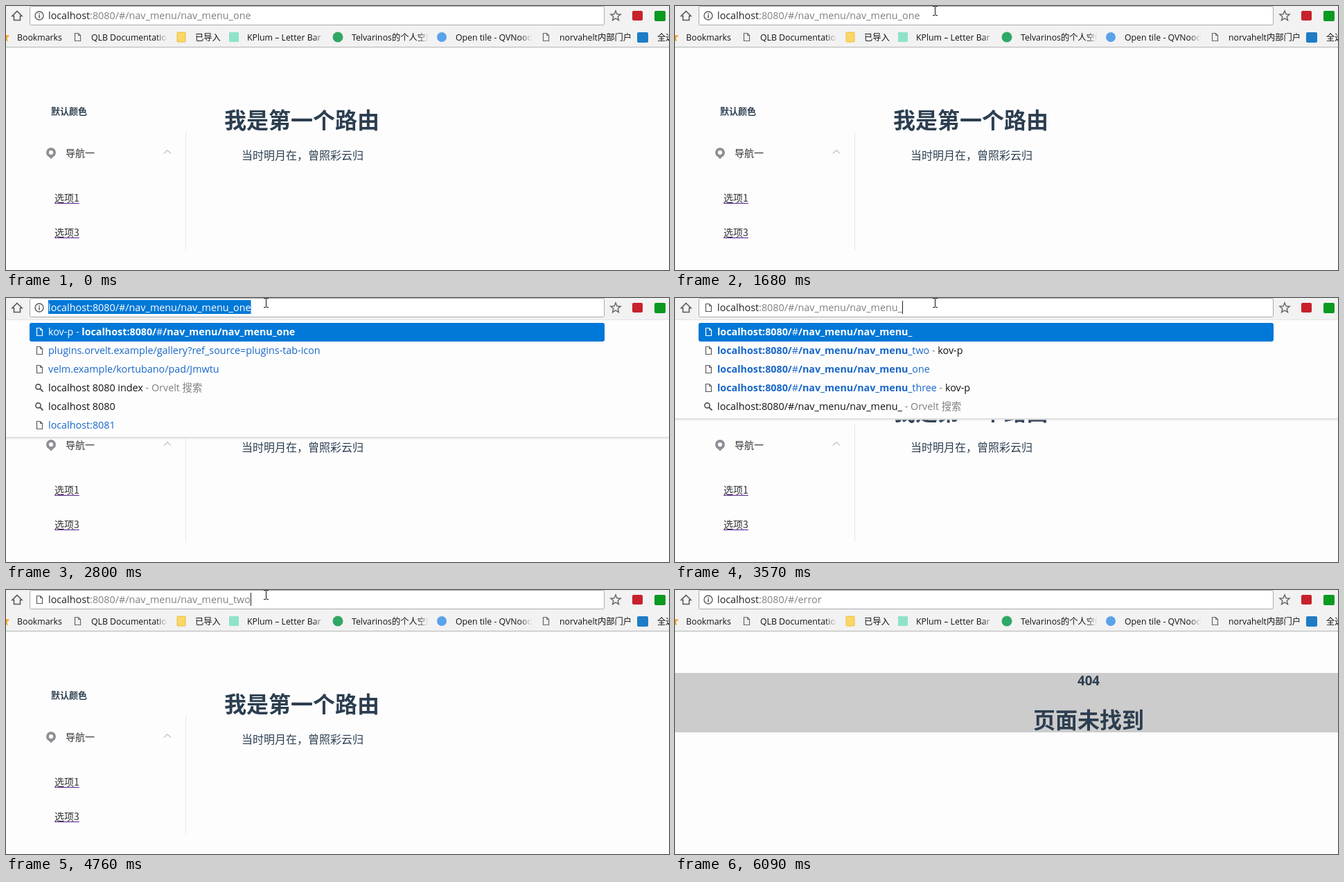
Write an HTML page with a canvas that moves like this. It is 957x382 px and loops after 6.72 s.

```html
<!DOCTYPE html>
<html lang="zh-CN">
<head>
<meta charset="utf-8">
<title>Route demo</title>
<style>
html, body { margin: 0; width: 100%; height: 100%; overflow: hidden; background: #fdfdfd; }
canvas { display: block; }
</style>
</head>
<body>
<canvas id="stage" width="957" height="382"></canvas>
<script>
const c = document.getElementById('stage').getContext('2d');
const LOOP = 6720, STEP = 70;
const UI = '"Open Sans", "Noto Sans CJK SC", "Noto Sans CJK", sans-serif';
const CJK = '"Noto Sans CJK SC", "Noto Sans CJK", sans-serif';
const BLUE = '#0078d7', LINK = '#1967c9', GREY = '#808080', INK = '#2c3e50';
const URL_FONT = `14.35px ${UI}`, URL_BOLD = `bold 14.3px ${UI}`;
const BASE = 'localhost:8080/#/nav_menu/nav_menu_';

function rect(x, y, w, h, color) {
  c.fillStyle = color;
  c.fillRect(x, y, w, h);
}

function rounded(x, y, w, h, r, fill, stroke) {
  c.beginPath();
  c.roundRect(x, y, w, h, r);
  if (fill) { c.fillStyle = fill; c.fill(); }
  if (stroke) { c.strokeStyle = stroke; c.lineWidth = 1; c.stroke(); }
}

function disc(x, y, r, color) {
  c.beginPath();
  c.arc(x, y, r, 0, 7);
  c.fillStyle = color;
  c.fill();
}

function poly(points, color, width, close, fill) {
  c.beginPath();
  points.forEach(([x, y]) => c.lineTo(x, y));
  if (close) c.closePath();
  if (fill) { c.fillStyle = fill; c.fill(); }
  if (width) { c.strokeStyle = color; c.lineWidth = width; c.stroke(); }
}

// Draws text and returns the x where it ends.
function text(str, x, y, font, color, align = 'left') {
  c.font = font;
  c.fillStyle = color;
  c.textAlign = align;
  c.fillText(str, x, y);
  return x + c.measureText(str).width;
}

function widthOf(str) {
  c.font = URL_FONT;
  return c.measureText(str).width;
}

function docIcon(x, y, color) {
  const l = x - 3.5, r = x + 4.5, t = y - 5.5, b = y + 5.5;
  poly([[l, t], [x + 1.5, t], [r, t + 3], [r, b], [l, b]], color, 1.2, true);
  poly([[x + 1.5, t], [x + 1.5, t + 3], [r, t + 3]], color, 1);
}

function searchIcon(x, y) {
  c.beginPath();
  c.arc(x - 1.5, y - 1.5, 3.6, 0, 7);
  c.strokeStyle = '#5a5a5a';
  c.lineWidth = 1.7;
  c.stroke();
  poly([[x + 1.2, y + 1.2], [x + 5.5, y + 5.5]], '#5a5a5a', 2);
}

function infoIcon(x, y) {
  c.beginPath();
  c.arc(x, y, 6, 0, 7);
  c.strokeStyle = '#5a5a5a';
  c.lineWidth = 1.4;
  c.stroke();
  rect(x - 0.8, y - 1, 1.6, 4.5, '#5a5a5a');
  rect(x - 0.8, y - 3.4, 1.6, 1.6, '#5a5a5a');
}

function star(x, y, r, color, fill) {
  const pts = Array.from({ length: 10 }, (_, i) => {
    const a = -Math.PI / 2 + i * Math.PI / 5, d = i % 2 ? r * 0.45 : r;
    return [x + d * Math.cos(a), y + d * Math.sin(a)];
  });
  poly(pts, color, 1.5, true, fill);
}

function addressBar({ url, selectFrom, caret, icon }) {
  rect(0, 0, 957, 60, '#f2f2f2');
  poly([[16, 7.5], [23, 14.5], [20.5, 14.5], [20.5, 20.5], [11.5, 20.5], [11.5, 14.5], [9, 14.5]], '#5a5a5a', 1.6, true);
  rounded(34.5, 0.5, 829, 27, 2, '#fff', '#a9a9a9');
  if (icon === 'doc') docIcon(48, 14, '#5a5a5a');
  else infoIcon(48, 14);

  const mid = text('localhost', 61, 19, URL_FONT, '#222');
  const end = text(url.slice(9), mid, 19, URL_FONT, GREY);
  if (selectFrom !== undefined) {
    const x = 61 + widthOf(url.slice(0, selectFrom));
    rect(x, 3, end - x, 20, BLUE);
    text(url.slice(selectFrom), x, 19, URL_FONT, '#fff');
  }
  if (caret) rect(Math.round(end), 4, 1, 19, '#222');

  star(880, 14.5, 7.5, '#6a6a6a');
  rounded(904, 7, 15, 14, 2, '#c8202c');
  rounded(936, 7, 16, 15, 2, '#0a9a20');
}

function bookmark(str, x, end) {
  let color = '#111';
  if (end) {
    color = c.createLinearGradient(end - 16, 0, end, 0);
    color.addColorStop(0, '#111');
    color.addColorStop(1, 'rgba(17,17,17,0)');
  }
  c.save();
  c.beginPath();
  c.rect(x, 34, (end || 957) - x, 24);
  c.clip();
  text(str, x, 50, `12.3px ${UI}`, color);
  c.restore();
}

function bookmarks() {
  star(-2, 45, 6, '#f5a623', '#f5a623');
  bookmark('Bookmarks', 16);
  docIcon(103, 45, '#666');
  bookmark('QLB Documentation', 123, 233);
  rounded(247, 38, 12, 14, 1, '#fbd866', '#e8bd45');
  bookmark('已导入', 273);
  rect(322, 38, 14, 14, '#8fe3cb');
  bookmark('KPlum – Letter Bar', 348, 460);
  disc(479, 45, 7.5, '#2fa866');
  bookmark('Telvarinos的个人空间', 499, 610);
  disc(629, 45, 7, '#5aa2ea');
  bookmark('Open tile - QVNoodl', 649, 759);
  docIcon(779, 45, '#666');
  bookmark('norvahelt内部门户', 799);
  rounded(911, 38, 16, 15, 2, '#1f7cc4');
  bookmark('全选', 940);
  rect(0, 59, 957, 1, '#b4b4b4');
}

function menuPage() {
  text('默认颜色', 65, 157, `bold 13px ${CJK}`, INK);
  disc(65, 212, 7, '#8d9095');
  poly([[58.8, 215], [65, 221.5], [71.2, 215]], '', 0, true, '#8d9095');
  disc(65, 212, 3.1, '#fdfdfd');
  text('导航一', 86, 218, `14px ${CJK}`, '#303133');
  poly([[228, 213.5], [233, 208.5], [238, 213.5]], '#909399', 1);
  rect(259, 183, 1, 170, '#e6e6e6');
  [['选项1', 283], ['选项3', 333]].forEach(([label, y]) => {
    const end = text(label, 70, y, `14px ${CJK}`, '#303133');
    rect(70, y + 2, end - 70, 1, '#551a8b');
  });
  text('我是第一个路由', 315, 176.5, `bold 32px ${CJK}`, INK);
  text('当时明月在，曾照彩云归', 340, 222, `16px ${CJK}`, INK);
}

function errorPage() {
  rect(0, 120, 957, 86, '#ccc');
  text('404', 597, 138, `bold 18.72px ${UI}`, INK, 'center');
  text('页面未找到', 597, 199.5, `bold 32px ${CJK}`, INK, 'center');
}

// Suggestion rows are lists of [text, style]; a leading "?" marks a search.
const bold = str => str.split(/(#)/).map(s => [s, s === '#' ? 'link' : 'bold']);
const page = (typed, rest, title) => [...bold(typed), [rest, 'link'], ...(title ? [[' - ', 'grey'], ['kov-p', 'dark']] : [])];
const search = (str, note = true) => ['?', [str, 'dark'], [note ? ' - Orvelt 搜索' : '', 'grey']];

const HISTORY = [
  [['kov-p - ', 'link'], ...bold(BASE + 'one')],
  [['plugins.orvelt.example/gallery?ref_source=plugins-tab-icon', 'link']],
  [['velm.example/kortubano/pad/Jmwtu', 'link']],
  search('localhost 8080 index'),
  search('localhost 8080', false),
  [['localhost:8081', 'link']]
];

function suggestions(typed) {
  const part = typed.slice(BASE.length);
  if (part[0] === 't') {
    const rows = [page(typed, 'two'.slice(part.length), true)];
    if (part === 't') rows.push(page(typed, 'hree', true));
    return [...rows, search(typed)];
  }
  return [page(typed, ''), page(BASE, 'two', true), page(BASE, 'one'), page(BASE, 'three', true), search(typed)];
}

function dropdown(rows) {
  const bottom = 41 + 27 * rows.length;
  const colors = { link: LINK, bold: LINK, grey: GREY, dark: '#111' };
  rect(0, 31, 957, bottom - 31, '#fdfdfd');
  rect(0, 31, 957, 1, '#e4e4e4');
  const shade = c.createLinearGradient(0, bottom - 2, 0, bottom + 2);
  shade.addColorStop(0, '#d8d8d8');
  shade.addColorStop(1, 'rgba(216,216,216,0)');
  rect(0, bottom - 2, 957, 4, shade);
  rounded(34, 36, 830, 27, 3, BLUE);
  rows.forEach((row, i) => {
    const y = 49 + 27 * i;
    const isSearch = row[0] === '?';
    if (isSearch) searchIcon(48, y);
    else docIcon(48, y, i ? '#5a5a5a' : '#fff');
    let x = 61;
    row.slice(isSearch ? 1 : 0).forEach(([str, style]) => {
      x = text(str, x, y + 5, style === 'bold' ? URL_BOLD : URL_FONT, i ? colors[style] : '#fff');
    });
  });
}

function iBeam(y) {
  rect(375, y + 1, 1, 12, '#111');
  rect(372, y, 3, 1, '#111');
  rect(376, y, 3, 1, '#111');
  rect(372, y + 13, 3, 1, '#111');
  rect(376, y + 13, 3, 1, '#111');
}

function arrow(x, y) {
  const shape = [[0, 0], [0, 16], [4, 12.5], [6.5, 18], [9, 17], [6.5, 11.5], [11.5, 11.5]];
  poly(shape.map(([dx, dy]) => [x + dx + 0.5, y + dy + 0.5]), '#000', 1, true, '#fff');
}

const PATHS = [
  [[210, 719, 320], [420, 260, 206], [560, 40, 270], [700, 84, 355], [840, 84, 245], [980, 200, 138], [1050, 279, 34]],
  [[5530, 560, 150], [5600, 738, 294], [5670, 738, 294], [5740, 755, 300], [5880, 825, 325], [6020, 906, 366]]
];

function pointer(t) {
  if (t >= 1540 && t < 5460) iBeam(Math.min(0, (t - 1680) / 14));
  for (const path of PATHS) {
    const next = path.findIndex(p => p[0] >= t);
    if (next < 0 || t < path[0][0]) continue;
    const b = path[next], a = path[Math.max(0, next - 1)];
    const k = b === a ? 0 : (t - a[0]) / (b[0] - a[0]);
    arrow(Math.round(a[1] + (b[1] - a[1]) * k), Math.round(a[2] + (b[2] - a[2]) * k));
  }
}

// Typed ending of the address, by time.
const TYPING = [[3290, 'one'], [3360, 'on'], [3430, 'o'], [3570, ''], [3990, 't'], [4200, 'tw'], [4410, 'two']];

function addressAt(t) {
  if (t >= 4830) return { url: 'localhost:8080/#/error' };
  if (t < 2100) return { url: BASE + 'one' };
  if (t < 3290) return { url: BASE + 'one', selectFrom: 0, rows: t >= 2800 && HISTORY };
  const part = TYPING.filter(k => k[0] <= t).pop()[1];
  const typed = BASE + part;
  const completing = part === 't' || part === 'tw';
  return {
    url: completing ? BASE + 'two' : typed,
    selectFrom: completing ? typed.length : undefined,
    caret: !completing,
    icon: 'doc',
    rows: t < 4760 && suggestions(typed)
  };
}

function draw(now) {
  const t = Math.floor((now % LOOP) / STEP) * STEP;
  const address = addressAt(t);
  rect(0, 0, 957, 382, '#fdfdfd');
  if (t < 4830) menuPage();
  else errorPage();
  addressBar(address);
  if (address.rows) dropdown(address.rows);
  else bookmarks();
  pointer(t);
}

const start = performance.now();
function tick() {
  draw(performance.now() - start);
  requestAnimationFrame(tick);
}
tick();
</script>
</body>
</html>
```
